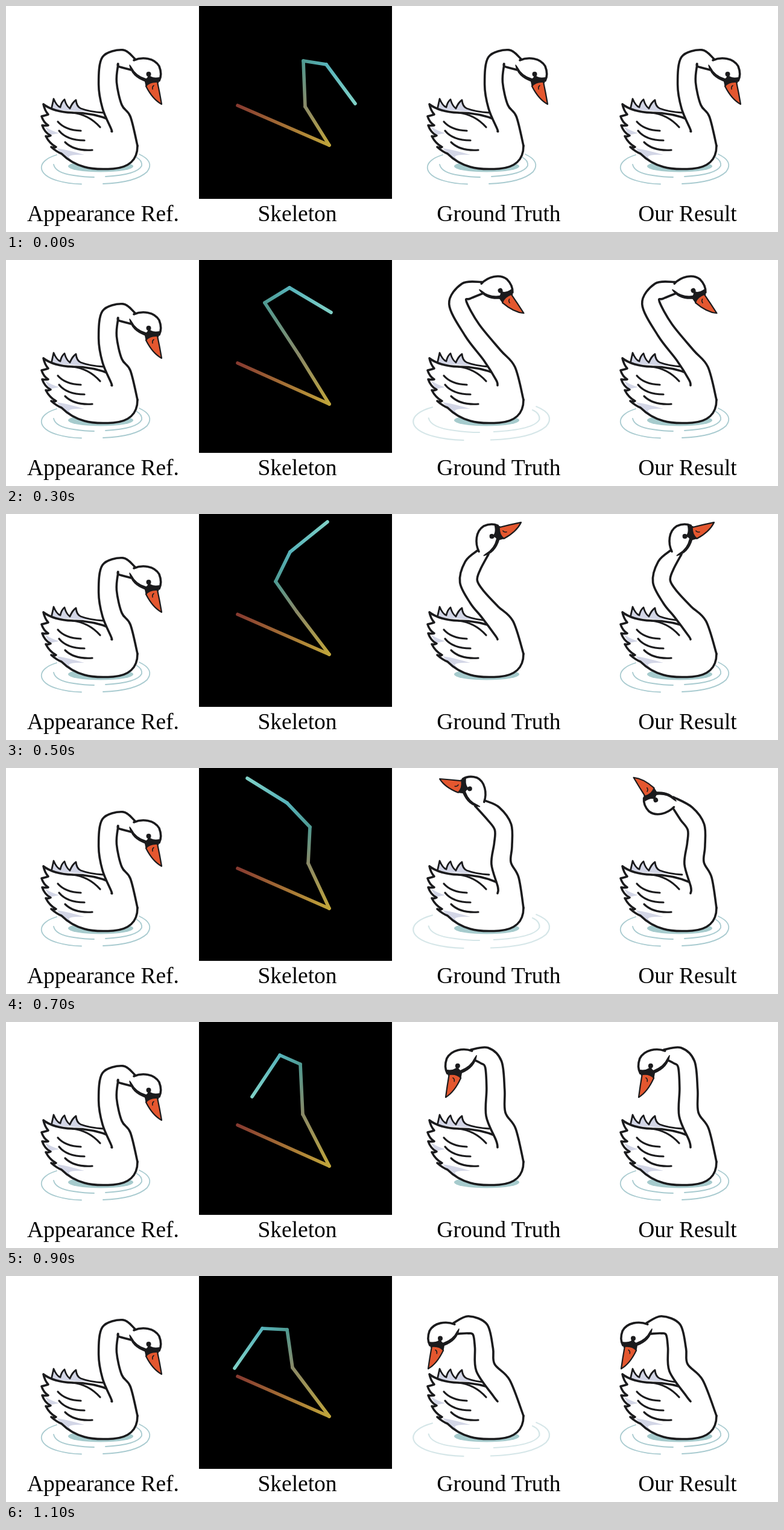
Animation, 1280 px wide and 375 px high, one loop 1200 ms. Source, as an HTML page with a canvas:

```html
<!DOCTYPE html>
<html lang="en">
<head>
<meta charset="utf-8">
<title>Swan pose transfer</title>
<style>
html, body { margin: 0; width: 100%; height: 100%; overflow: hidden; background: #fff; }
canvas, svg { position: absolute; left: 0; top: 0; }
text { font: 37.5px "Liberation Serif", "Times New Roman", serif; text-anchor: middle; }
</style>
</head>
<body>
<canvas id="stage" width="1280" height="375"></canvas>
<svg width="1280" height="375">
  <text x="161" y="357">Appearance Ref.</text>
  <text x="483" y="357">Skeleton</text>
  <text x="817" y="357">Ground Truth</text>
  <text x="1130" y="357">Our Result</text>
</svg>
<script>
const ctx = document.getElementById('stage').getContext('2d');
const INK = '#1b1b1d', STEP = 100, STEPS = 12;

// Key poses: step, then lower neck, upper neck, head joint and beak tip.
// The same joints drive the skeleton and both swans.
const poses = [
  [0, [176, 167], [173, 91], [211, 97], [259, 162]],
  [2, [170, 163], [134, 69], [179, 62], [227, 129]],
  [3, [166, 158], [109, 71], [150, 46], [219, 87]],
  [5, [162, 162], [127, 112], [151, 63], [213, 13]],
  [7, [181, 158], [184, 98], [146, 58], [80, 17]],
  [9, [172, 153], [168, 70], [134, 55], [88, 124]],
  [11, [155, 152], [146, 89], [105, 87], [59, 153]]
];
const boneColors = ['#873a30', '#c0a53a', '#8a8967', '#4f9a92', '#57b3ba', '#7fd0c6'];

const shape = {
  rings: new Path2D('M84 247C50 257 50 280 86 290Q103 295 125 295.500M161 295Q215 293 234 275Q247 258 221 246' +
    'M79 263Q82 277 112 281Q130 284 146 284M165 283Q218 280 225 265Q226 256 216 251'),
  farWing: new Path2D('M75 172L79 154Q84 166 90 168Q92 159 97 155Q100 166 106 170Q110 160 116 156Q117 167 124 170Q140 176 161 177'),
  body: new Path2D('M175 190Q145 177 110 177Q79 176 62 163Q64 173 70 180Q64 182 59 183Q62 193 70 198Q65 199 60 198' +
    'Q64 210 74 215Q70 217 66 216Q72 228 83 234Q79 236 75 234Q84 242 92 245Q108 261 130 267Q146 272 178 270C203 268 218 256 218 232'),
  shade: new Path2D('M84 236Q104 239 130 247Q108 246 104 250Q110 260 128 267Q102 260 92 245ZM64 200Q75 207 88 211L73 214Z'),
  feathers: new Path2D('M110 177Q137 180 156 201M86 192Q98 206 124 207M88 207Q101 223 130 223M98 226Q113 241 143 239'),
  face: new Path2D('M213 89C226 84 246 86 254 100C258 110 257 118 254 126L234 128Q215 124 208 110L206 100Z'),
  dome: new Path2D('M212 90C226 84 246 86 254 100C258 110 257 118 254 124'),
  chin: new Path2D('M205 98Q208 117 231 125L232 121Q215 116 208 102Z'),
  mask: new Path2D('M229 121Q236 121 236 112Q240 121 255 118L253 128Q240 124 232 135Z'),
  beak: new Path2D('M232 133Q238 125 251 126Q255 145 258 163Q243 155 232 133Z'),
  nostril: new Path2D('M245 132Q242 134 243 138')
};

const mix = (a, b, u) => a + (b - a) * u;
const sub = (a, b) => [a[0] - b[0], a[1] - b[1]];

function stroke(path, width = 3.6, color = INK) {
  ctx.lineWidth = width;
  ctx.strokeStyle = color;
  ctx.stroke(path);
}
function fill(path, color) {
  ctx.fillStyle = color;
  ctx.fill(path);
}

// Joints at a step, interpolated between key poses
function jointsAt(step) {
  const i = poses.findLastIndex(p => p[0] <= step);
  const [t0, ...a] = poses[i], [t1, ...b] = poses[Math.min(i + 1, poses.length - 1)];
  const u = t1 > t0 ? (step - t0) / (t1 - t0) : 0;
  return a.map((p, n) => p.map((v, k) => mix(v, b[n][k], u)));
}

// Smooth curve through points, continuing the path
function through(path, pts, start) {
  path[start](...pts[0]);
  for (let i = 0; i < pts.length - 1; i++) {
    const p = pts[i], q = pts[i + 1], a = pts[i - 1] || p, b = pts[i + 2] || q;
    path.bezierCurveTo(
      p[0] + (q[0] - a[0]) / 6, p[1] + (q[1] - a[1]) / 6,
      q[0] - (b[0] - p[0]) / 6, q[1] - (b[1] - p[1]) / 6, ...q);
  }
}

// Point and direction on the curved spine; t counts segments from the chest
function spineAt(pts, t) {
  const i = Math.floor(t) + 1, u = t % 1;
  const p = pts[i], q = pts[i + 1], size = Math.hypot(...sub(q, p));
  const tangent = j => {
    const d = sub(pts[j + 1], pts[j - 1]);
    return d.map(v => v * size / Math.hypot(...d));
  };
  const m = tangent(i), n = tangent(i + 1);
  const point = [0, 1].map(k => mix(p[k], q[k], u * u * (3 - 2 * u)) +
    m[k] * u * (1 - u) ** 2 - n[k] * u * u * (1 - u));
  const dir = [0, 1].map(k => 6 * u * (1 - u) * (q[k] - p[k]) +
    m[k] * (1 - u) * (1 - 3 * u) + n[k] * u * (3 * u - 2));
  return [point, dir];
}

// Neck edge on one side (-1 left, 1 right), narrowing towards the head
function neckEdge(joints, side, first, last) {
  const spine = [[135, 275], [197, 220], ...joints];
  const middle = [0.5, 1, 1.5, 2, 2.5].map(t => {
    const [[x, y], [dx, dy]] = spineAt(spine, t);
    const w = side * (14 + 11 * Math.exp(-1.6 * t)) / Math.hypot(dx, dy);
    return [x - dy * w, y + dx * w];
  });
  return [first, ...middle, last];
}

function water(scale) {
  if (scale) {
    ctx.save();
    ctx.globalAlpha = 1 - (scale - 1) * 2;
    ctx.translate(150, 268);
    ctx.scale(scale, 1 + (scale - 1) * 0.5);
    ctx.translate(-150, -268);
    stroke(shape.rings, 1.8, '#a9cbd0');
    ctx.restore();
  }
  const pool = new Path2D();
  pool.ellipse(157, 266, 54, 9.5, 0, 0, 7);
  fill(pool, '#a6cbcd');
}

function head(m) {
  ctx.transform(m.a, m.b, m.c, m.d, m.e, m.f);
  fill(shape.face, '#fff');
  stroke(shape.dome);
  fill(shape.chin, INK);
  stroke(shape.chin, 1.5);
  fill(shape.mask, INK);
  const eye = new Path2D();
  eye.arc(236.5, 113, 4, 0, 7);
  fill(eye, INK);
  fill(shape.beak, '#e4572f');
  stroke(shape.beak, 2.2);
  stroke(shape.nostril, 1.6);
}

// From step `turn` on, the head is mirrored about its bone.
function swan(x, step, turn, ripple) {
  const joints = jointsAt(step), [, , joint, tip] = joints;
  const [bx, by] = sub(tip, joint);
  const flip = step >= turn ? -1 : 1;
  const m = new DOMMatrix().translate(...joint)
    .rotate(Math.atan2(by, bx) * 180 / Math.PI)
    .scale(Math.hypot(bx, by) / 80.8, flip)
    .rotate(-53.6).translate(-211, -97);
  const place = (px, py) => {
    const p = m.transformPoint({ x: px, y: py });
    return [p.x, p.y];
  };
  const ends = [place(214, 88), place(207, 106)];
  if (flip < 0) ends.reverse();

  const left = neckEdge(joints, -1, [175, 208], ends[0]);
  const right = neckEdge(joints, 1, [218, 232], ends[1]);
  const neck = new Path2D(), edges = new Path2D();
  through(neck, left, 'moveTo');
  through(neck, right.toReversed(), 'lineTo');
  through(edges, left, 'moveTo');
  through(edges, right, 'moveTo');

  ctx.save();
  ctx.translate(x, 0);
  water(ripple);
  fill(shape.farWing, '#d3d6e6');
  stroke(shape.farWing, 2.8);
  fill(shape.body, '#fff');
  fill(shape.shade, '#d3d6e6');
  stroke(shape.body);
  fill(neck, '#fff');
  stroke(shape.feathers, 3.2);
  stroke(edges);
  head(m);
  ctx.restore();
}

function skeleton(step) {
  ctx.save();
  ctx.translate(320, 0);
  ctx.fillStyle = '#000';
  ctx.fillRect(0, 0, 320, 320);
  const bob = -Math.cos(step * Math.PI / 3);
  const pts = [[64, 168 + 3 * bob], [216, 235 + 4 * bob], ...jointsAt(step)];
  for (let i = 0; i < pts.length - 1; i++) {
    const grad = ctx.createLinearGradient(...pts[i], ...pts[i + 1]);
    grad.addColorStop(0, boneColors[i]);
    grad.addColorStop(1, boneColors[i + 1]);
    const bone = new Path2D();
    bone.moveTo(...pts[i]);
    bone.lineTo(...pts[i + 1]);
    stroke(bone, 5.6, grad);
  }
  ctx.restore();
}

function draw(now) {
  const step = Math.floor(now / STEP) % STEPS;
  const wave = step % 4;
  ctx.fillStyle = '#fff';
  ctx.fillRect(0, 0, 1280, 375);
  ctx.lineCap = ctx.lineJoin = 'round';
  swan(0, 0, 7, 1);
  skeleton(step);
  swan(640, step, 7, wave === 1 ? 0 : 1 + 0.086 * wave);
  swan(960, step, 8, 1);
}

let start;
function tick(now) {
  start ??= now;
  draw(now - start);
  requestAnimationFrame(tick);
}
draw(0);
requestAnimationFrame(tick);
</script>
</body>
</html>
```
